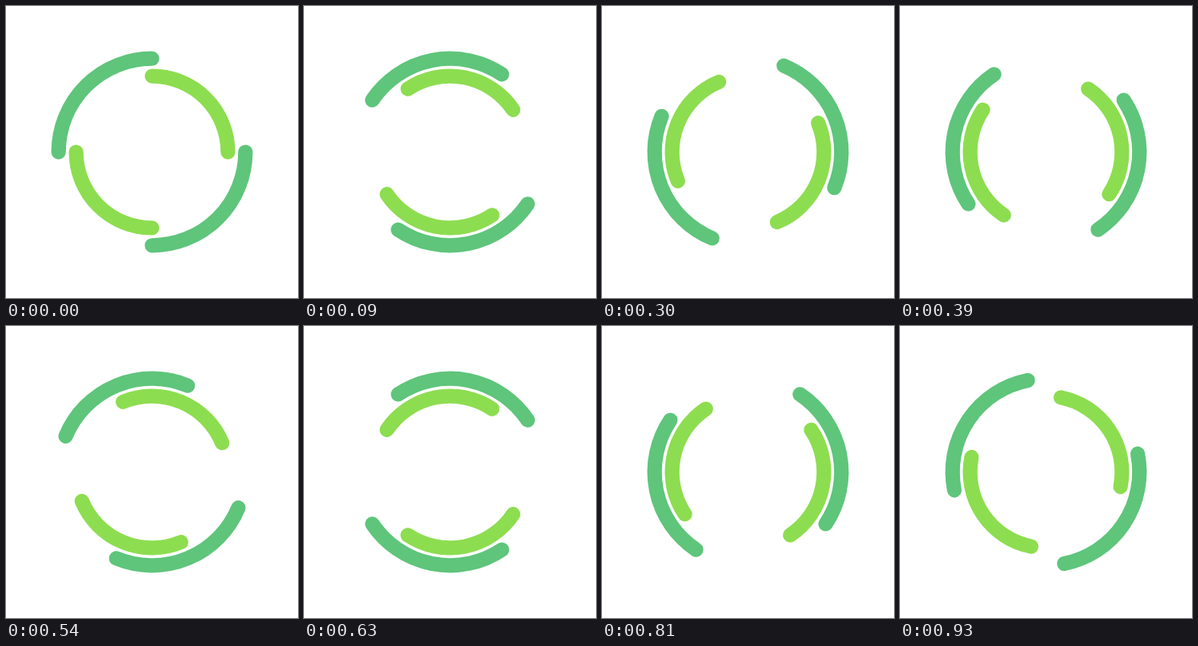
An HTML page that plays this animation: 365x365 px, repeating every 960 ms.

```html
<!DOCTYPE html>
<html lang="en">
<head>
<meta charset="utf-8">
<title>Double ring spinner</title>
<style>
  html, body { margin: 0; width: 100%; height: 100%; overflow: hidden; background: #fff; }
  svg { display: block; width: 100vw; height: 100vh; }
  path { fill: none; stroke-width: 5; stroke-linecap: round; }
</style>
</head>
<body>
<svg viewBox="-50 -50 100 100">
  <path id="outer" stroke="#5ec57b" d="M32 0A32 32 0 0 1 0 32M-32 0A32 32 0 0 1 0 -32"/>
  <path id="inner" stroke="#8ddd50" d="M0 26A26 26 0 0 1 -26 0M0 -26A26 26 0 0 1 26 0"/>
</svg>
<script>
  const LOOP = 960, STEP = 30;
  const outer = document.getElementById('outer');
  const inner = document.getElementById('inner');

  // The rings turn in opposite directions, in 32 even steps per loop.
  function draw() {
    const time = performance.now() % LOOP;
    const angle = Math.floor(time / STEP) * STEP / LOOP * 360;
    outer.setAttribute('transform', `rotate(${angle})`);
    inner.setAttribute('transform', `rotate(${-angle})`);
    requestAnimationFrame(draw);
  }
  draw();
</script>
</body>
</html>
```
